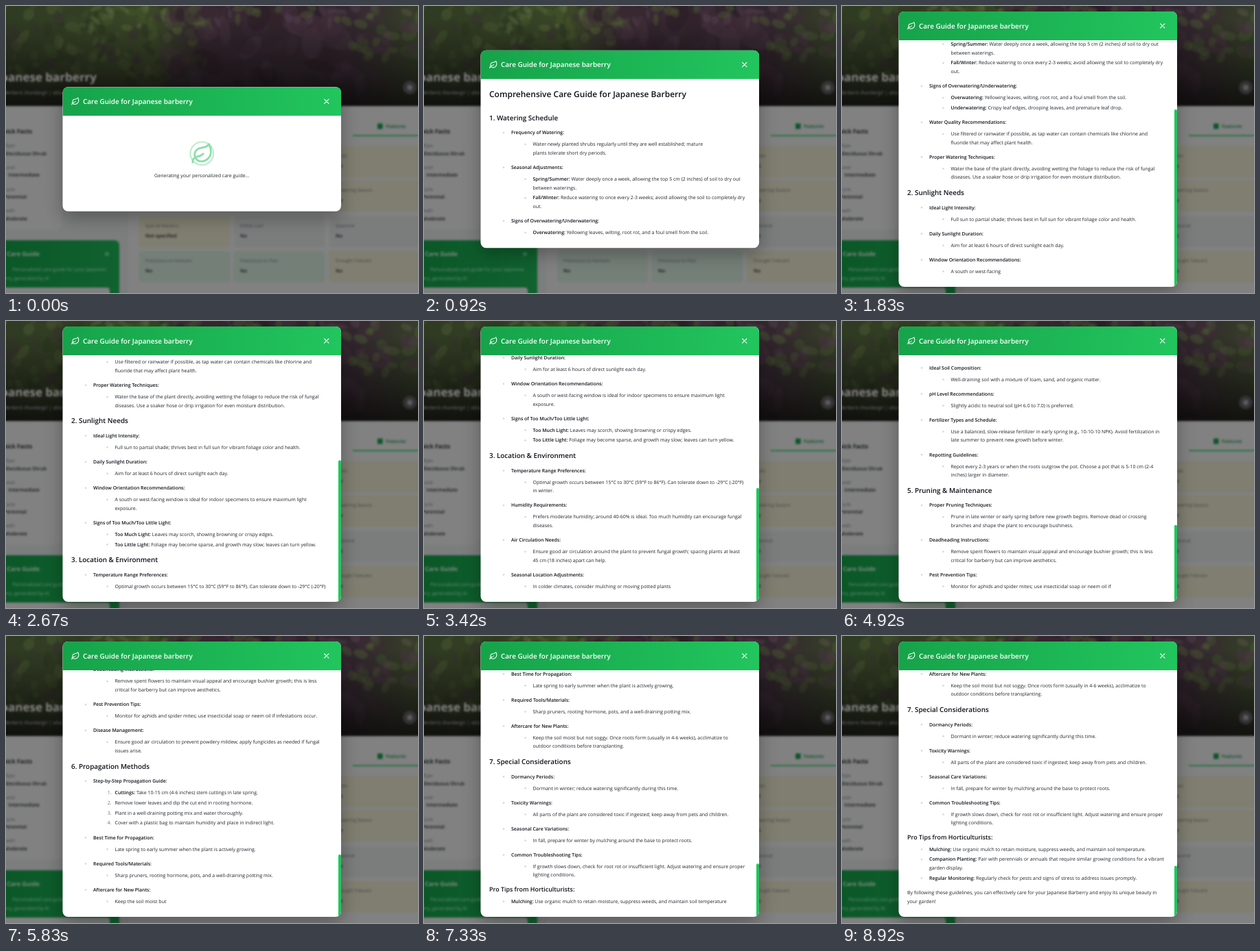
These frames come from a looping animation (600 px wide and 419 px high, 9 s). An HTML page with a canvas:

```html
<!DOCTYPE html>
<html lang="en">
<head>
<meta charset="utf-8">
<title>Care guide</title>
<style>
html, body { margin: 0; width: 100%; height: 100%; overflow: hidden; background: #7c7d7d; }
canvas { display: block; width: 600px; height: 419px; }
</style>
</head>
<body>
<canvas id="stage"></canvas>
<script>
const W = 600, H = 419, LOOP = 9000, FPS = 12;
const FAMILY = "'Open Sans', 'Noto Sans', sans-serif";
const BOX = { x: 82.5, w: 405.5, mid: 209, head: 42, view: 360, radius: 8 };
const PAGE = '#7c7d7d', CARD = '#808180', INK = '#1f2329', STRONG = '#0d1117';
const canvas = document.getElementById('stage');
const ratio = window.devicePixelRatio || 1;

function setUp(c) {
  c.width = W * ratio;
  c.height = H * ratio;
  const g = c.getContext('2d');
  g.scale(ratio, ratio);
  g.textRendering = 'geometricPrecision';
  return g;
}
const ctx = setUp(canvas);

// Row types: T title, H section, B topic, N detail, L numbered, P tips heading, I tip, G paragraph.
// "|" ends a bold label, "+" continues the row above on a new line.
const ROWS = `
T Comprehensive Care Guide for Japanese Barberry
H 1. Watering Schedule
B Frequency of Watering:
N Water newly planted shrubs regularly until they are well established; mature
+ plants tolerate short dry periods.
B Seasonal Adjustments:
N Spring/Summer:| Water deeply once a week, allowing the top 5 cm (2 inches) of soil to dry out
+ between waterings.
N Fall/Winter:| Reduce watering to once every 2-3 weeks; avoid allowing the soil to completely dry
+ out.
B Signs of Overwatering/Underwatering:
N Overwatering:| Yellowing leaves, wilting, root rot, and a foul smell from the soil.
N Underwatering:| Crispy leaf edges, drooping leaves, and premature leaf drop.
B Water Quality Recommendations:
N Use filtered or rainwater if possible, as tap water can contain chemicals like chlorine and
+ fluoride that may affect plant health.
B Proper Watering Techniques:
N Water the base of the plant directly, avoiding wetting the foliage to reduce the risk of fungal
+ diseases. Use a soaker hose or drip irrigation for even moisture distribution.
H 2. Sunlight Needs
B Ideal Light Intensity:
N Full sun to partial shade; thrives best in full sun for vibrant foliage color and health.
B Daily Sunlight Duration:
N Aim for at least 6 hours of direct sunlight each day.
B Window Orientation Recommendations:
N A south or west-facing window is ideal for indoor specimens to ensure maximum light
+ exposure.
B Signs of Too Much/Too Little Light:
N Too Much Light:| Leaves may scorch, showing browning or crispy edges.
N Too Little Light:| Foliage may become sparse, and growth may slow; leaves can turn yellow.
H 3. Location & Environment
B Temperature Range Preferences:
N Optimal growth occurs between 15°C to 30°C (59°F to 86°F). Can tolerate down to -29°C (-20°F)
+ in winter.
B Humidity Requirements:
N Prefers moderate humidity; around 40-60% is ideal. Too much humidity can encourage fungal
+ diseases.
B Air Circulation Needs:
N Ensure good air circulation around the plant to prevent fungal growth; spacing plants at least
+ 45 cm (18 inches) apart can help.
B Seasonal Location Adjustments:
N In colder climates, consider mulching or moving potted plants to a sheltered area to
+ protect roots from freezing.
H 4. Soil & Nutrition
B Ideal Soil Composition:
N Well-draining soil with a mixture of loam, sand, and organic matter.
B pH Level Recommendations:
N Slightly acidic to neutral soil (pH 6.0 to 7.0) is preferred.
B Fertilizer Types and Schedule:
N Use a balanced, slow-release fertilizer in early spring (e.g., 10-10-10 NPK). Avoid fertilization in
+ late summer to prevent new growth before winter.
B Repotting Guidelines:
N Repot every 2-3 years or when the roots outgrow the pot. Choose a pot that is 5-10 cm (2-4
+ inches) larger in diameter.
H 5. Pruning & Maintenance
B Proper Pruning Techniques:
N Prune in late winter or early spring before new growth begins. Remove dead or crossing
+ branches and shape the plant to encourage bushiness.
B Deadheading Instructions:
N Remove spent flowers to maintain visual appeal and encourage bushier growth; this is less
+ critical for barberry but can improve aesthetics.
B Pest Prevention Tips:
N Monitor for aphids and spider mites; use insecticidal soap or neem oil if infestations occur.
B Disease Management:
N Ensure good air circulation to prevent powdery mildew; apply fungicides as needed if fungal
+ issues arise.
H 6. Propagation Methods
B Step-by-Step Propagation Guide:
L Cuttings:| Take 10-15 cm (4-6 inches) stem cuttings in late spring.
L Remove lower leaves and dip the cut end in rooting hormone.
L Plant in a well-draining potting mix and water thoroughly.
L Cover with a plastic bag to maintain humidity and place in indirect light.
B Best Time for Propagation:
N Late spring to early summer when the plant is actively growing.
B Required Tools/Materials:
N Sharp pruners, rooting hormone, pots, and a well-draining potting mix.
B Aftercare for New Plants:
N Keep the soil moist but not soggy. Once roots form (usually in 4-6 weeks), acclimatize to
+ outdoor conditions before transplanting.
H 7. Special Considerations
B Dormancy Periods:
N Dormant in winter; reduce watering significantly during this time.
B Toxicity Warnings:
N All parts of the plant are considered toxic if ingested; keep away from pets and children.
B Seasonal Care Variations:
N In fall, prepare for winter by mulching around the base to protect roots.
B Common Troubleshooting Tips:
N If growth slows down, check for root rot or insufficient light. Adjust watering and ensure proper
+ lighting conditions.
P Pro Tips from Horticulturists:
I Mulching:| Use organic mulch to retain moisture, suppress weeds, and maintain soil temperature.
I Companion Planting:| Pair with perennials or annuals that require similar growing conditions for a vibrant
+ garden display.
I Regular Monitoring:| Regularly check for pests and signs of stress to address issues promptly.
G By following these guidelines, you can effectively care for your Japanese Barberry and enjoy its unique beauty in
+ your garden!`.trim().split('\n');

const STYLE = {
  T: { x: 95, size: 12, bold: true }, H: { x: 95, size: 9.92, bold: true },
  P: { x: 95, size: 8.92, bold: true }, B: { x: 127, size: 6.92, bold: true, dot: 116 },
  N: { x: 158.5, size: 7, dot: 147.5 }, L: { x: 158.5, size: 7 },
  I: { x: 127, size: 7, dot: 116 }, G: { x: 95, size: 7 }
};
const GAPS = { TH: 34.6, HB: 21.6, BN: 17, BL: 17, NN: 14.8, LL: 14.8, II: 14.7, NP: 20.5, PI: 17.8, IG: 21.4 };

function layOut() {
  let type = '', y = 22, start = 0, count = 0;
  return ROWS.map(row => {
    const next = row[0], wrap = next === '+';
    const parts = row.slice(2).split('|');
    if (wrap) y += 12.6;
    else {
      if (type) y += GAPS[type + next] || (next === 'H' ? 22.6 : 21.1);
      type = next;
    }
    count = type === 'L' ? count + 1 : 0;
    const text = parts.join('');
    const line = { ...STYLE[type], type, wrap, y, start, text, count };
    line.split = line.bold ? text.length : parts.length > 1 ? parts[0].length : 0;
    start += text.length + 1;
    return line;
  });
}
const lines = layOut();
const story = lines.map(l => l.text).join('\n');
const endOf = s => story.indexOf(s) + s.length;

// Streaming progress: [step, characters shown]
const KEYS = [
  [2, 0], [22, endOf('west-facing')], [41, endOf('moving potted plants')],
  [59, endOf('neem oil if')], [70, endOf('Keep the soil moist but')],
  [88, endOf('soil temperature')], [99, story.length]
];

function shownAt(step) {
  if (step <= KEYS[0][0]) return 0;
  const i = KEYS.findIndex(k => step <= k[0]);
  if (i < 0) return story.length;
  const [s0, n0] = KEYS[i - 1], [s1, n1] = KEYS[i];
  let n = Math.floor(n0 + (n1 - n0) * (step - s0) / (s1 - s0));
  while (n > 0 && n < story.length && !/[\s.,;]/.test(story[n])) n--;
  return n;
}

function write(g, s, x, y, size, color, weight = 400, align = 'left', slant = '') {
  g.font = `${slant} ${weight} ${size}px ${FAMILY}`;
  g.fillStyle = color;
  g.textAlign = align;
  g.fillText(s, x, y);
}

function panel(g, x, y, w, h, r, fill) {
  g.fillStyle = fill;
  g.beginPath();
  g.roundRect(x, y, w, h, r);
  g.fill();
}

function disc(g, x, y, r, fill) {
  g.fillStyle = fill;
  g.beginPath();
  g.arc(x, y, r, 0, Math.PI * 2);
  g.fill();
}

const leaf = new Path2D('M11 20A7 7 0 0 1 9.8 6.1C15.5 5 17 4.48 19 2c1 2 2 4.18 2 8 0 5.5-4.78 10-10 10Z M2 21c0-3 1.85-5.36 5.08-6C9.5 14.52 12 13 13 12');
function drawLeaf(g, x, y, scale, color) {
  g.save();
  g.translate(x, y);
  g.scale(scale, scale);
  g.strokeStyle = color;
  g.lineWidth = 2;
  g.lineCap = g.lineJoin = 'round';
  g.stroke(leaf);
  g.restore();
}

function drawPhoto(g) {
  let seed = 11;
  const rnd = () => (seed = seed * 16807 % 2147483647) / 2147483647;
  const base = g.createLinearGradient(0, 0, W, 0);
  base.addColorStop(0, '#2f3a22');
  base.addColorStop(0.36, '#3a4627');
  base.addColorStop(0.48, '#32252d');
  base.addColorStop(0.85, '#33272f');
  base.addColorStop(1, '#344026');
  g.fillStyle = base;
  g.fillRect(-10, -10, W + 20, 156);
  const blobs = (n, x0, x1, y1, size, tones) => {
    for (let i = 0; i < n; i++) {
      g.fillStyle = tones[Math.floor(rnd() * tones.length)];
      g.beginPath();
      g.ellipse(x0 + rnd() * (x1 - x0), rnd() * y1, size * (0.5 + rnd()), size * (0.4 + rnd() * 0.6), rnd() * 3, 0, 7);
      g.fill();
    }
  };
  g.globalAlpha = 0.5;
  blobs(130, -10, 290, 110, 8, ['#40502b', '#28331e', '#4a5932', '#303c24', '#372f31']);
  blobs(40, 110, 300, 38, 7, ['#55673a', '#45552a', '#5d6b42']);
  blobs(90, 235, 550, 135, 17, ['#33222b', '#3e2c36', '#483542', '#281b23', '#382833']);
  blobs(35, 500, 610, 75, 9, ['#3f4f2d', '#4c5a34', '#473541']);
  blobs(22, 290, 600, 24, 7, ['#4a5633', '#513f4d']);
  g.globalAlpha = 1;
  const shade = g.createLinearGradient(0, 20, 0, 146);
  shade.addColorStop(0, 'rgba(10,9,9,0)');
  shade.addColorStop(0.55, 'rgba(10,9,9,.45)');
  shade.addColorStop(1, 'rgba(10,9,9,.84)');
  g.fillStyle = shade;
  g.fillRect(-10, -10, W + 20, 156);
}

function drawPage(g) {
  g.fillStyle = PAGE;
  g.fillRect(-10, -10, W + 20, H + 20);
  drawPhoto(g);
  write(g, 'Japanese barberry', 132, 110, 17, '#878385', 700, 'right');
  write(g, 'Berberis thunbergii | also', 82, 129, 7.5, '#6f6c6e', 400, 'right', 'italic');
  disc(g, 588, 119, 10, '#343234');
  disc(g, 588, 119, 4, '#5c595b');

  panel(g, -20, 148, 101, 178, 7, CARD);
  write(g, 'Quick Facts', 38, 186, 8.5, '#14171b', 700, 'right');
  [['Type', 'Deciduous Shrub', 59], ['Care Level', 'Intermediate', 49],
   ['Life Cycle', 'Perennial', 30], ['Growth', 'Moderate', 31]].forEach(([label, value, end], i) => {
    const y = 206 + i * 31.8;
    write(g, label, 13, y, 6.5, '#404349', 400, 'right');
    write(g, value, end, y + 11.5, 7.2, '#14171b', 600, 'right');
  });

  const green = g.createLinearGradient(0, 0, 165, 0);
  green.addColorStop(0, '#0b5727');
  green.addColorStop(1, '#10622f');
  panel(g, -20, 342, 185, 100, 7, green);
  write(g, 'Care Guide', 49, 365, 8.8, '#7f8b83', 700, 'right');
  disc(g, 147, 362, 3, '#3c7a52');
  write(g, 'Personalized care guide for your Japanese', 146, 387, 7, '#6d8f7a', 400, 'right');
  write(g, 'barberry, generated by AI', 63, 400, 7, '#6d8f7a', 400, 'right');
  panel(g, -20, 411, 171, 30, 4, CARD);

  panel(g, 178, 148, 450, 300, 7, CARD);
  write(g, 'Features', 553, 178, 7, '#0b4f26', 600);
  panel(g, 541, 171.5, 7.5, 8, 1, '#0d5529');
  panel(g, 505, 188.5, 110, 1.6, 0, '#0f6a34');

  const cream = '#7f7e70', sage = '#747f78', plain = '#7b7c7c';
  const grid = [
    [205, [cream, plain, cream], ['Flowers', 'Cones', 'Fruits'], ['Yes', 'No', 'No']],
    [255, [sage, cream, cream], ['Edible Leaf', 'Thorny', 'Flowering Season'], ['No', 'Yes', 'No']],
    [307, [cream, plain, plain], ['Special Markers', 'Edible Leaf', 'Seasonal'], ['Not specified', 'No', 'No']],
    [358, [sage, sage, cream], ['Poisonous to Humans', 'Poisonous to Pets', 'Drought Tolerant'], ['No', 'No', 'No']]
  ];
  for (const [y, fills, labels, values] of grid) {
    [194, 332, 471].forEach((x, i) => {
      panel(g, x, y, i < 2 ? 132 : 140, 45, 4, fills[i]);
      write(g, labels[i], x + 9, y + 16, 6.6, '#3f4247');
      write(g, values[i], x + 9, y + 31, 7.2, '#14171b', 600);
    });
  }
}

const page = document.createElement('canvas');
const blurred = document.createElement('canvas');
drawPage(setUp(page));
const soft = setUp(blurred);
soft.drawImage(page, 0, 0, W, H);
soft.filter = `blur(${1.8 * ratio}px)`;
soft.drawImage(page, 0, 0, W, H);

function drawLoader(top, step) {
  const cx = 285.3, cy = top + 97;
  ctx.save();
  ctx.translate(cx, cy);
  ctx.rotate(step * 0.5);
  ctx.strokeStyle = '#bcebcd';
  ctx.lineWidth = 2.2;
  ctx.setLineDash([1.4, 1.7]);
  ctx.beginPath();
  ctx.arc(0, 0, 16.8, 0, Math.PI * 2);
  ctx.stroke();
  ctx.restore();
  drawLeaf(ctx, cx - 16.3, cy - 16.3, 1.4, '#8adfa9');
  write(ctx, 'Generating your personalized care guide...', 285.2, top + 131.5, 7.02, INK, 400, 'center');
}

function drawLine(line, y, n) {
  const text = line.text.slice(0, n);
  const strong = text.slice(0, line.split);
  const rest = text.slice(line.split);
  const base = y + line.size * 0.355;
  let x = line.x;
  if (!line.wrap && line.dot) disc(ctx, line.dot, y + 0.2, 1.25, '#d1d5db');
  if (!line.wrap && line.type === 'L') write(ctx, line.count + '.', 153.5, base, line.size, '#6b7280', 400, 'right');
  if (strong) {
    write(ctx, strong, x, base, line.bold ? line.size : 6.92, STRONG, 600);
    x += ctx.measureText(strong).width;
  }
  if (rest) write(ctx, rest, x, base, line.size, INK);
}

function drawText(top, content, n) {
  const view = Math.min(content, BOX.view);
  const scroll = content - view;
  const y0 = top + BOX.head;
  ctx.save();
  ctx.beginPath();
  ctx.rect(BOX.x, y0, BOX.w, view);
  ctx.clip();
  for (const line of lines) {
    const y = y0 + line.y - scroll;
    if (line.start >= n || y < y0 - 10) continue;
    drawLine(line, y, n - line.start);
  }
  if (scroll > 0) {
    const size = view * view / content;
    panel(ctx, BOX.x + BOX.w - 4, y0 + view - size, 4, size, 2, '#22c55e');
  }
  ctx.restore();
}

function drawHeader(top) {
  const fill = ctx.createLinearGradient(BOX.x, 0, BOX.x + BOX.w, 0);
  fill.addColorStop(0, '#16a34a');
  fill.addColorStop(1, '#22c55e');
  ctx.fillStyle = fill;
  ctx.fillRect(BOX.x, top, BOX.w, BOX.head);
  drawLeaf(ctx, 94.8, top + 14.7, 0.525, '#fff');
  write(ctx, 'Care Guide for Japanese barberry', 112, top + 24.8, 9.95, '#fff', 600);
  ctx.strokeStyle = '#fff';
  ctx.lineWidth = 1.1;
  ctx.lineCap = 'round';
  ctx.beginPath();
  const cx = 466.8, cy = top + 21, r = 3.2;
  ctx.moveTo(cx - r, cy - r);
  ctx.lineTo(cx + r, cy + r);
  ctx.moveTo(cx + r, cy - r);
  ctx.lineTo(cx - r, cy + r);
  ctx.stroke();
}

function draw(time) {
  const step = Math.floor((time % LOOP + 5) * FPS / 1000);
  const n = shownAt(step);
  let content = 139.5;
  if (n) for (const line of lines) if (line.start < n) content = line.y + 22.7;
  const height = BOX.head + Math.min(content, BOX.view);
  const top = BOX.mid - height / 2;

  ctx.drawImage(blurred, 0, 0, W, H);
  ctx.save();
  ctx.shadowColor = 'rgba(0,0,0,.3)';
  ctx.shadowBlur = 26 * ratio;
  ctx.shadowOffsetY = 9 * ratio;
  panel(ctx, BOX.x, top, BOX.w, height, BOX.radius, '#fff');
  ctx.restore();

  ctx.save();
  ctx.beginPath();
  ctx.roundRect(BOX.x, top, BOX.w, height, BOX.radius);
  ctx.clip();
  drawHeader(top);
  if (n) drawText(top, content, n);
  else drawLoader(top, step);
  ctx.restore();
}

const begin = performance.now();
function tick() {
  draw(performance.now() - begin);
  requestAnimationFrame(tick);
}
tick();
</script>
</body>
</html>
```
